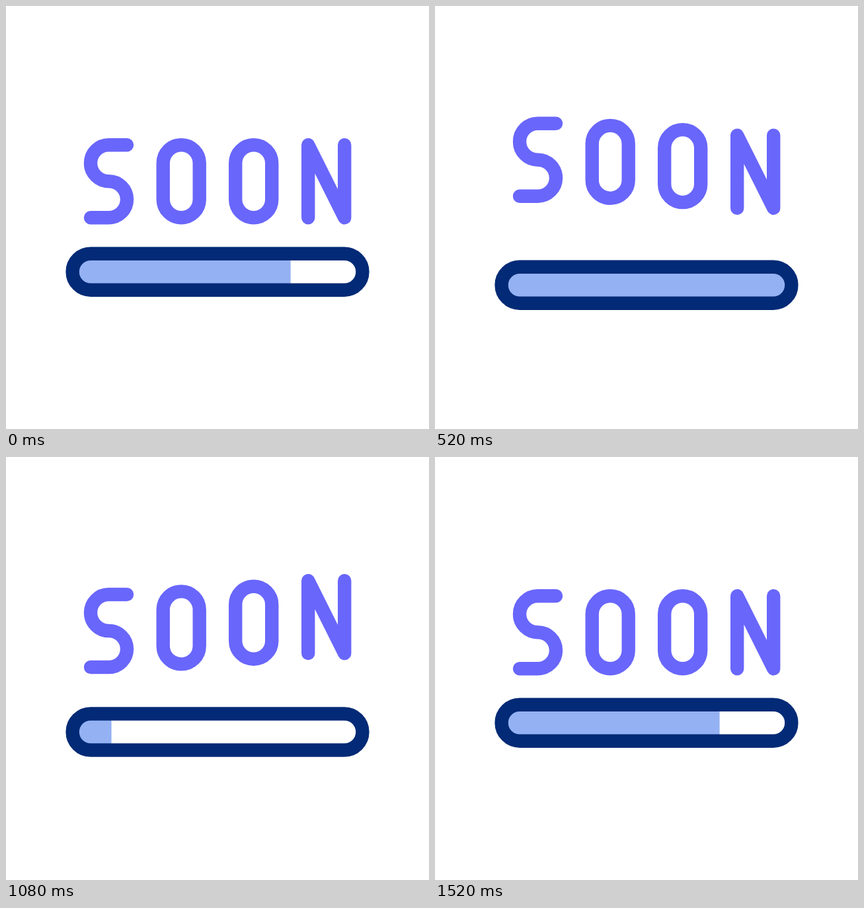
These frames come from a looping animation (640 px wide and 640 px high, 1560 ms). An HTML page:

```html
<!DOCTYPE html>
<html lang="en">
<head>
<meta charset="utf-8">
<title>Soon</title>
<style>
  html, body { margin: 0; width: 100%; height: 100%; overflow: hidden; background: #fff; }
  svg { display: block; width: 100%; height: 100%; }
  .letters, .frame { fill: none; stroke-width: 20.4; stroke-linecap: round; stroke-linejoin: round; }
  .letters { stroke: #6966fb; }
  .frame { stroke: #022a76; }
  .fill { fill: #94b1f3; }
</style>
</head>
<body>
<svg viewBox="0 0 640 640">
  <defs>
    <clipPath id="inside"><rect x="100.6" y="374.7" width="438.8" height="55" rx="27.5"/></clipPath>
  </defs>
  <g class="letters">
    <path d="M183 210.2H155.5a27.5 27.5 0 0 0 0 55a27.5 27.5 0 0 1 0 55H128"/>
    <rect x="237.7" y="210.2" width="55" height="110" rx="27.5"/>
    <rect x="347.2" y="210.2" width="55" height="110" rx="27.5"/>
    <path d="M457.2 320.2v-110l55 110v-110"/>
  </g>
  <g id="bar">
    <rect id="fill" class="fill" x="100.6" y="374.7" height="55" clip-path="url(#inside)"/>
    <rect class="frame" x="100.6" y="374.7" width="438.8" height="55" rx="27.5"/>
  </g>
</svg>
<script>
const LOOP = 1560, STEP = 40;
const letters = [...document.querySelector('.letters').children];
const bar = document.getElementById('bar');
const fill = document.getElementById('fill');

// cubic-bezier(.5, 0, .5, 1)
function ease(x) {
  if (x <= 0) return 0;
  if (x >= 1) return 1;
  let lo = 0, hi = 1;
  for (let i = 0; i < 24; i++) {
    const s = (lo + hi) / 2;
    if (1.5 * s * (1 - s) + s ** 3 < x) lo = s; else hi = s;
  }
  return lo * lo * (3 - 2 * lo);
}

const ramp = (t, start, end) => ease((t - start) / (end - start));
const moveY = (node, y) => node.setAttribute('transform', `translate(0 ${y})`);

function fillEdge(t) {
  return t < 740
    ? 430.6 + 136 * ramp(t, 60, 740)
    : 110.6 + 320 * ramp(t, 930, 1440);
}

function draw(t) {
  letters.forEach((letter, i) => {
    const local = t - i * 80;
    moveY(letter, -33.4 * (ramp(local, 0, 600) - ramp(local, 600, 1200)));
  });
  moveY(bar, 24.7 * (ramp(t, 60, 740) - ramp(t, 760, 1440)));
  fill.setAttribute('width', fillEdge(t) - 100.6);
}

function tick() {
  const t = performance.now() % LOOP;
  draw(Math.floor(t / STEP) * STEP);
  requestAnimationFrame(tick);
}
tick();
</script>
</body>
</html>
```
